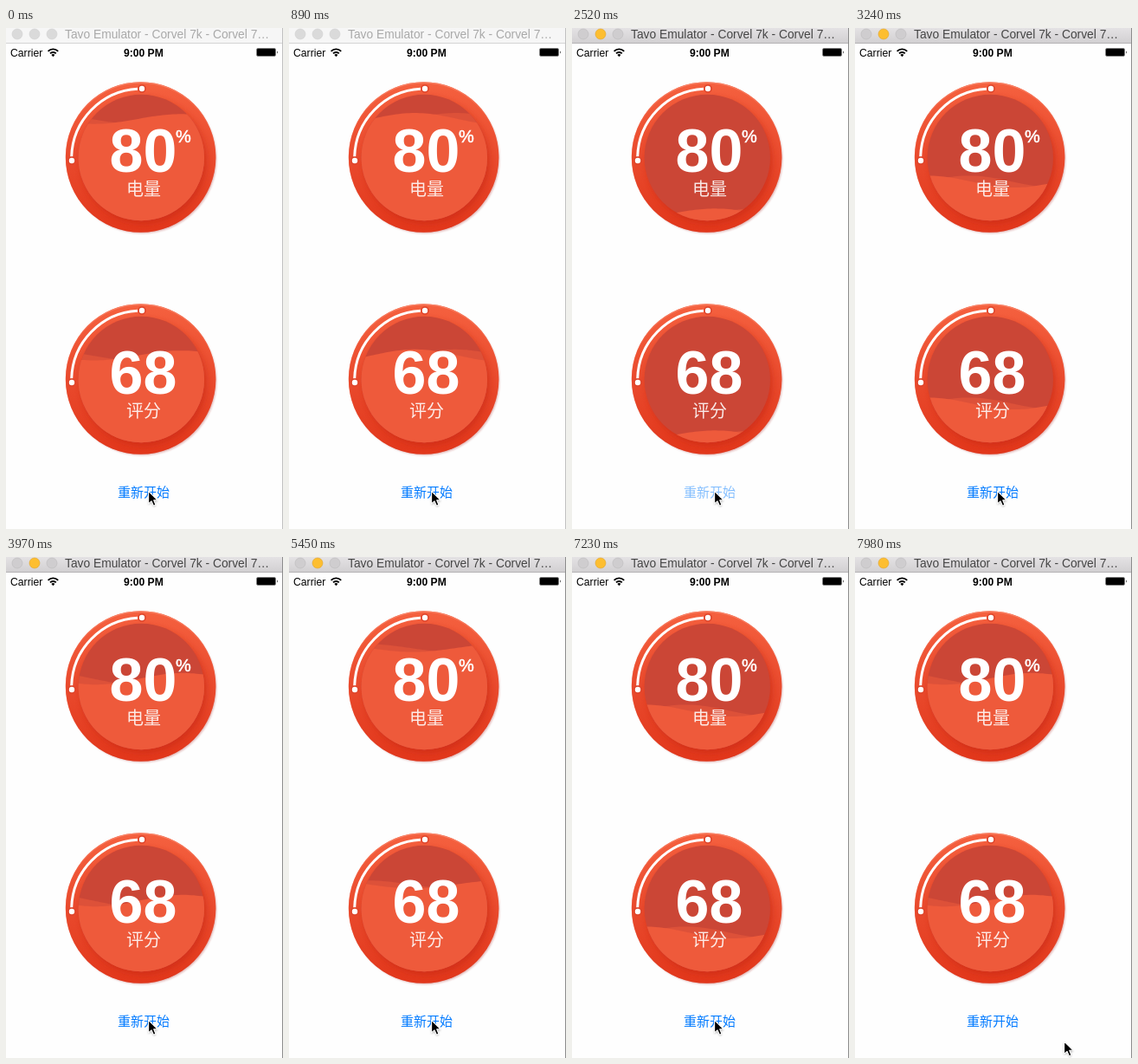
Recreate the animation shown at these times as an HTML page. Size 320x578 px, loop 8000 ms.

```html
<!DOCTYPE html>
<html lang="zh-Hans">
<head>
<meta charset="utf-8">
<title>Gauges</title>
<style>
html, body { margin: 0; width: 100%; height: 100%; overflow: hidden; background: #fefefe; }
svg { display: block; width: 100%; height: 100%; }
text { font-family: "Liberation Sans", Arial, sans-serif; white-space: pre; }
.cjk { font-family: "Noto Sans CJK SC", "Noto Sans CJK", sans-serif; font-weight: 300; }
.num { font-weight: 700; font-size: 70px; fill: #fff; }
.pct { font-size: 20px; fill: #fff; stroke: #fff; stroke-width: .5; }
.label { font-size: 20px; fill: #fff; fill-opacity: .88; }
</style>
</head>
<body>
<svg viewBox="0 0 320 578" preserveAspectRatio="none">
  <defs>
    <linearGradient id="ringFill" x1="0" y1="0" x2="0" y2="1">
      <stop offset="0" stop-color="#f5613f"/>
      <stop offset=".5" stop-color="#e94a2d"/>
      <stop offset="1" stop-color="#e2371b"/>
    </linearGradient>
    <linearGradient id="rim" x1="0" y1="0" x2="0" y2="1">
      <stop offset="0" stop-color="#f98468"/>
      <stop offset=".35" stop-color="#f0583a" stop-opacity=".3"/>
      <stop offset="1" stop-color="#d8341b" stop-opacity=".3"/>
    </linearGradient>
    <linearGradient id="barFill" x1="0" y1="0" x2="0" y2="1">
      <stop offset="0" stop-color="#e4e2e4"/>
      <stop offset="1" stop-color="#d2d0d2"/>
    </linearGradient>
    <filter id="soft" x="-20%" y="-20%" width="140%" height="140%"><feGaussianBlur stdDeviation="3"/></filter>
    <filter id="faint" x="-20%" y="-20%" width="140%" height="140%"><feGaussianBlur stdDeviation="1.2"/></filter>
    <clipPath id="bowl"><circle cx="156.3" cy="149.5" r="72.7"/></clipPath>
    <clipPath id="plate"><circle cx="155.6" cy="149" r="86.7"/></clipPath>
  </defs>

  <rect width="320" height="578" fill="#fefefe"/>
  <rect id="bar" width="320" height="17"/>
  <rect id="barLine" y="17" width="320" height="1"/>
  <g id="lights"></g>
  <text id="title" x="68" y="12" font-size="13.8">Tavo Emulator - Corvel 7k - Corvel 7…</text>

  <text x="5" y="33" font-size="12.2">Carrier</text>
  <g fill="none" stroke="#000" stroke-width="1.9">
    <path d="M48.6 26.8a8.2 8.2 0 0 1 11.6 0M51 29.4a4.8 4.8 0 0 1 6.8 0"/>
    <path d="M54.4 33.2l-2-2.2a2.8 2.8 0 0 1 4 0z" fill="#000" stroke="none"/>
  </g>
  <text x="136" y="33" font-size="12.1" font-weight="700">9:00 PM</text>
  <rect x="289.5" y="23.5" width="22" height="9" rx="1.5" fill="none" stroke="#000" stroke-opacity=".5"/>
  <rect x="290" y="24" width="21" height="8" rx=".8"/>
  <path d="M313 26.3q1.6 1.7 0 3.4z"/>

  <g id="gauges"></g>
  <text id="button" class="cjk" x="129" y="541" font-size="15" fill="#007aff">重新开始</text>
  <rect id="edge" x="319" width="1" height="578"/>
  <g id="cursor">
    <path d="M0 1.5V16L3.5 13L6 18L8.5 17L6.5 12H11Z" opacity=".35" filter="url(#faint)"/>
    <path d="M0 0V14.6L3.4 11.5L5.8 17L8.4 15.9L6.1 10.5H10.6Z" stroke="#fff" stroke-width="1.1" stroke-linejoin="round"/>
  </g>
</svg>
<script>
const LOOP = 8000, TICK = 148.27, WAVELENGTH = 200;
const $ = id => document.getElementById(id);
const set = (el, attrs) => { for (const k in attrs) el.setAttribute(k, attrs[k]); };
const clamp = v => Math.max(0, Math.min(1, v));

const gauges = [
  { value: 80, unit: '%', label: '电量', top: 0, level: 105 },
  { value: 68, unit: '', label: '评分', top: 256, level: 121.8 }
];

const dot = (x, y) =>
  `<circle cx="${x}" cy="${y}" r="4.8" fill="#de452b"/><circle cx="${x}" cy="${y}" r="3.2" fill="#fff"/>`;

$('gauges').innerHTML = gauges.map(g => `
  <g transform="translate(0 ${g.top})">
    <circle cx="157.2" cy="151" r="86" fill="#a33" opacity=".35" filter="url(#faint)"/>
    <circle cx="155.6" cy="149" r="86.8" fill="url(#ringFill)"/>
    <circle cx="155.6" cy="149" r="86.2" fill="none" stroke="url(#rim)" stroke-width="1.2"/>
    <g clip-path="url(#plate)">
      <circle cx="159" cy="153.5" r="73" fill="#c92b12" opacity=".6" filter="url(#soft)"/>
    </g>
    <circle cx="156.3" cy="149.5" r="72.7" fill="#cb4636"/>
    <g clip-path="url(#bowl)">
      <path class="back" fill="#dd5139"/>
      <path class="front" fill="#ee5a3b"/>
    </g>
    <path d="M75.7 148.5A80.7 80.7 0 0 1 152 70.2" fill="none" stroke="#fff" stroke-width="3"/>
    ${dot(157, 70)}${dot(76, 153)}
    <text class="num" x="119.5" y="166.3">${g.value}</text>
    <text class="pct" x="196" y="132">${g.unit}</text>
    <text class="label cjk" x="139" y="193">${g.label}</text>
  </g>`).join('');

$('lights').innerHTML = [13, 33, 53].map(x => `<circle cx="${x}" cy="7" r="6"/>`).join('');
const lights = $('lights').children;
const backs = document.querySelectorAll('.back');
const fronts = document.querySelectorAll('.front');

function wave(level, amp, trough) {
  let d = 'M82 230';
  for (let x = 82; x <= 232; x += 3) {
    const y = level + amp * Math.cos((x - trough) * 2 * Math.PI / WAVELENGTH);
    d += `L${x} ${y.toFixed(2)}`;
  }
  return d + 'V230Z';
}

function drawWindow(active) {
  set($('bar'), { fill: active ? 'url(#barFill)' : '#f6f6f6' });
  set($('barLine'), { fill: active ? '#b4b2b4' : '#d4d4d4' });
  set($('title'), { fill: active ? '#454545' : '#a9a9a9' });
  set($('edge'), { fill: active ? '#8c8c8c' : '#c0c0c0' });
  for (let i = 0; i < 3; i++) {
    set(lights[i], active
      ? { fill: i === 1 ? '#fdbe30' : '#cfcdcf', stroke: i === 1 ? '#e0a32a' : '#bcbabc', 'stroke-width': .6 }
      : { fill: '#dadada', stroke: '#d0d0d0', 'stroke-width': .6 });
  }
}

function draw(t) {
  // the screen refreshes in even ticks, with one slightly short stretch
  const tick = Math.floor((t + (t > 3000 ? 38 : 10)) / TICK);
  const start = tick >= 44 ? 44 : tick >= 17 ? 17 : 0;
  const n = tick - start;
  const restarted = start > 0;

  drawWindow(restarted);

  // two waves about a quarter period apart, drifting right
  const trough = (restarted ? 65 : 102) + 23.9 * n;
  const amp = 5.8 + 1.2 * Math.cos(Math.PI * (n - 7) / 13);
  gauges.forEach((g, i) => {
    const level = restarted ? Math.max(g.level, 214 - 7.35 * n) : g.level;
    set(backs[i], { d: wave(level, amp, trough + 47) });
    set(fronts[i], { d: wave(level, amp, trough) });
  });

  set($('button'), { opacity: restarted ? Math.min(1, .48 + .36 * n) : 1 });

  const p = clamp((tick - 49) / 4);
  const e = p * p * (3 - 2 * p);
  set($('cursor'), { transform: `translate(${164.6 + 77 * e} ${534.3 + 24.5 * e})` });
}

function loop() {
  draw(performance.now() % LOOP);
  requestAnimationFrame(loop);
}
loop();
</script>
</body>
</html>
```
